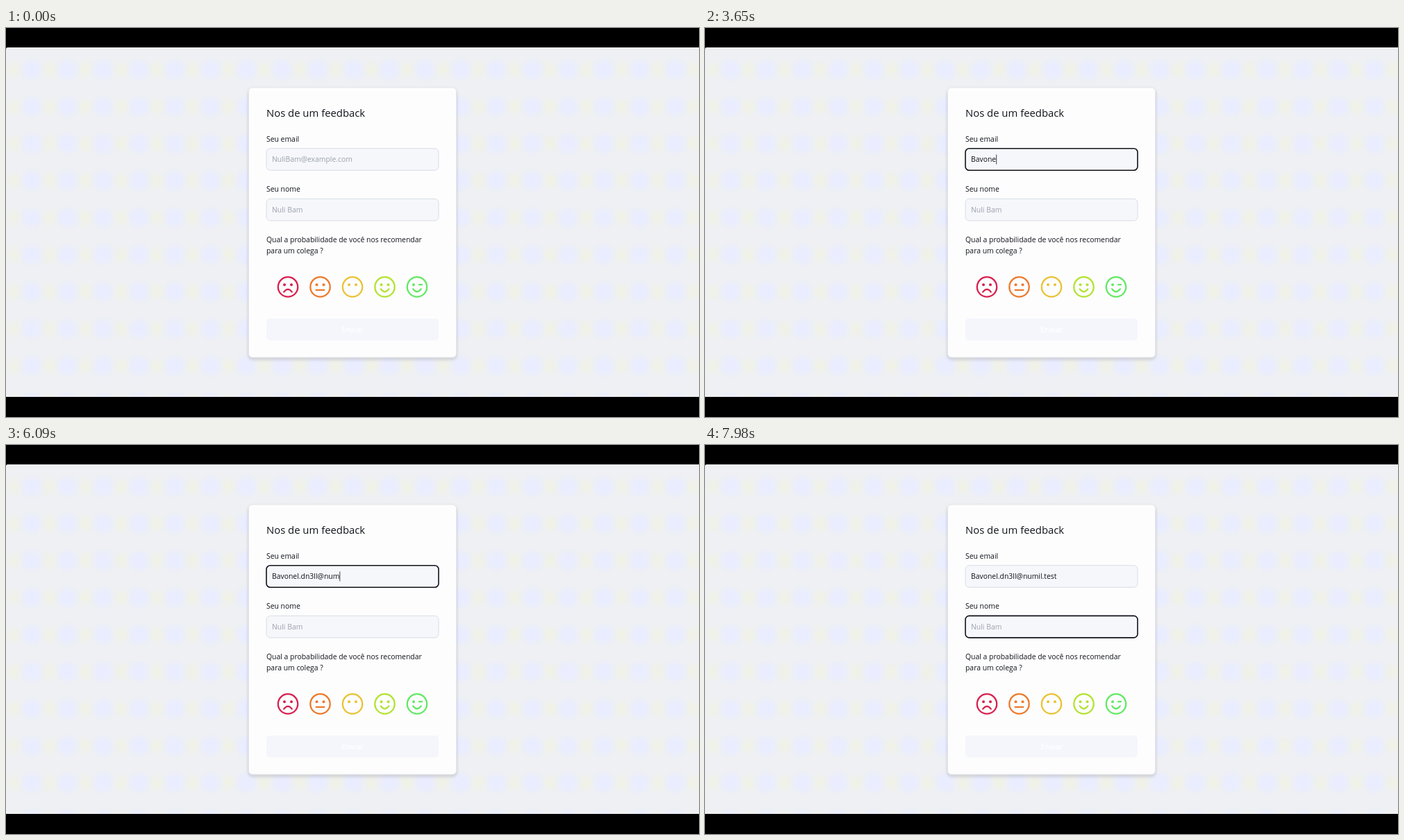
Animation of 998x561 px, one loop 8000 ms. Source, as an HTML page:

```html
<!DOCTYPE html>
<html lang="pt-BR">
<head>
<meta charset="utf-8">
<title>Feedback</title>
<style>
  html, body { margin: 0; width: 100%; height: 100%; overflow: hidden; background: #000; }
  svg { display: block; width: 100vw; height: 100vh; }
  text { font: 500 10.4px "Open Sans", "Noto Sans", sans-serif; fill: #10131a; white-space: pre; }
  .title { font-size: 14.85px; }
  .hint { fill: #9da1ad; }
  .send { font-weight: 600; fill: #fff; text-anchor: middle; }
  .face { fill: none; stroke: currentColor; stroke-width: 2.3; stroke-linecap: round; }
  .eye { fill: currentColor; stroke: none; }
</style>
</head>
<body>
<svg id="stage" viewBox="0 0 998 561" preserveAspectRatio="none">
  <defs>
    <radialGradient id="blue">
      <stop offset=".35" stop-color="#e9edff"/>
      <stop offset="1" stop-color="#e9edff" stop-opacity="0"/>
    </radialGradient>
    <radialGradient id="cream">
      <stop offset=".2" stop-color="#f0f1e7"/>
      <stop offset="1" stop-color="#f0f1e7" stop-opacity="0"/>
    </radialGradient>
    <pattern id="gingham" x="11.25" y="33.3" width="51.5" height="53.4" patternUnits="userSpaceOnUse">
      <rect width="51.5" height="53.4" fill="#eef0f3"/>
      <circle cx="0" cy="26.7" r="15" fill="url(#cream)"/>
      <circle cx="51.5" cy="26.7" r="15" fill="url(#cream)"/>
      <circle cx="25.75" cy="26.7" r="19" fill="url(#blue)"/>
    </pattern>
    <filter id="shadow" x="-10%" y="-10%" width="120%" height="120%">
      <feDropShadow dx="0" dy="2.5" stdDeviation="2.2" flood-color="#1e293b" flood-opacity=".2"/>
    </filter>
  </defs>

  <rect width="998" height="561" fill="#000"/>
  <rect y="28" width="998" height="504" fill="url(#gingham)"/>
  <path d="M0 28h2.5q-2.5 0-2.5 2.5z" fill="#000"/>

  <rect x="349.5" y="86" width="299" height="389" rx="5.5" fill="#fdfdfd" stroke="#e1e4ea" stroke-width=".8" filter="url(#shadow)"/>
  <text class="title" x="375" y="127.7">Nos de um feedback</text>
  <text x="375" y="163.6">Seu email</text>
  <text x="375" y="236.4">Seu nome</text>
  <text x="375" y="309.3">Qual a probabilidade de você nos recomendar</text>
  <text x="375" y="325">para um colega ?</text>

  <g id="fields"></g>
  <g id="faces"></g>

  <rect x="375" y="419" width="248" height="31.5" rx="5" fill="#f5f6fc"/>
  <text class="send" x="499" y="438.8">Enviar</text>

  <path id="caret" d="M.5 0v14" fill="none" stroke="#3c414b" stroke-width="1"/>
  <path id="arrow" d="M0 0v8.2l1.9-1.7 1.3 2.7 1.3-.6-1.2-2.6h2.5z" fill="#fff" stroke="#6d7180" stroke-width=".9" stroke-linejoin="round"/>
  <circle id="ring" cx="427.3" cy="185.7" r="2.3" fill="#f9dfe5" stroke="#df4c68" stroke-width="1.2"/>
</svg>
<script>
const LOOP = 8000, CLICK = 2200, NAME_FOCUS = 6960, BLINK = 530;
const EMAIL = "Bavonel.dn3ll@numil.test";
const NS = "http://www.w3.org/2000/svg";
const $ = id => document.getElementById(id);

function add(parent, tag, attrs, content) {
  const node = document.createElementNS(NS, tag);
  for (const key in attrs) node.setAttribute(key, attrs[key]);
  if (content) node.textContent = content;
  return parent.appendChild(node);
}

function makeField(y, hint) {
  return {
    y, hint,
    box: add($("fields"), "rect", { x: 375, y, width: 248, height: 31.5, rx: 5.5, fill: "#f5f7fb" }),
    label: add($("fields"), "text", { x: 383, y: y + 19.7 })
  };
}
const email = makeField(173.7, "NuliBam@example.com");
const person = makeField(246.4, "Nuli Bam");

const SMILE = "M-5.8 3q5.8 8 11.6 0";
const faces = [
  ["#d8214f", "M-5.8 7.2q5.8-7.6 11.6 0"],
  ["#ed7a2c", "M-5.8 4.5h11.6"],
  ["#eac235", ""],
  ["#b2e332", SMILE],
  ["#63e965", SMILE + "M3 -3.2h4", true]
];
faces.forEach(([color, lines, wink], i) => {
  const g = add($("faces"), "g", {
    class: "face", style: `color:${color}`, transform: `translate(${406 + 46.5 * i} 373.4)`
  });
  add(g, "circle", { r: 14.2 });
  if (lines) add(g, "path", { d: lines });
  for (const x of wink ? [-5] : [-5, 5]) add(g, "circle", { class: "eye", cx: x, cy: -3.2, r: 2 });
});

// Moments at which each character of the address arrives
const keys = [...EMAIL].map((c, i) =>
  i < 6 ? 2650 + i * 175 : i === 6 ? 3840 : i === 7 ? 4620 : 5120 + (i - 8) * 108);

// Pointer stops: time, x, y
const stops = [[120, 780, 492], [860, 640, 330], [1280, 440, 153], [1800, 430, 176], [CLICK, 427, 185]];
const ease = k => k * k * (3 - 2 * k);

function pointerAt(t) {
  const i = stops.findIndex(s => t < s[0]);
  if (i < 1) return null;
  const [t0, x0, y0] = stops[i - 1], [t1, x1, y1] = stops[i];
  const k = ease((t - t0) / (t1 - t0));
  return [x0 + (x1 - x0) * k, y0 + (y1 - y0) * k];
}

function show(node, visible) {
  node.setAttribute("visibility", visible ? "visible" : "hidden");
}

function drawField(field, value, focused) {
  field.label.textContent = value || field.hint;
  field.label.setAttribute("class", value ? "" : "hint");
  field.box.setAttribute("stroke", focused ? "#10131a" : "#d5dae1");
  field.box.setAttribute("stroke-width", focused ? 1.6 : 0.9);
}

function render(t) {
  const typed = keys.filter(k => k <= t).length;
  const onName = t >= NAME_FOCUS;
  const focused = onName ? person : t >= CLICK ? email : null;
  drawField(email, EMAIL.slice(0, typed), focused === email);
  drawField(person, "", focused === person);

  const last = onName ? NAME_FOCUS : typed ? keys[typed - 1] : CLICK;
  const lit = focused && Math.floor((t - last) / BLINK) % 2 === 0;
  show($("caret"), lit);
  if (lit) {
    const width = !onName && typed ? email.label.getComputedTextLength() : 0;
    $("caret").setAttribute("transform", `translate(${383 + width} ${focused.y + 8.8})`);
  }

  const pos = pointerAt(t);
  show($("arrow"), pos);
  if (pos) $("arrow").setAttribute("transform", `translate(${pos})`);
  show($("ring"), t >= CLICK && t < CLICK + 220);
}

const start = performance.now();
function tick() {
  render((performance.now() - start) % LOOP);
  requestAnimationFrame(tick);
}
tick();
</script>
</body>
</html>
```
